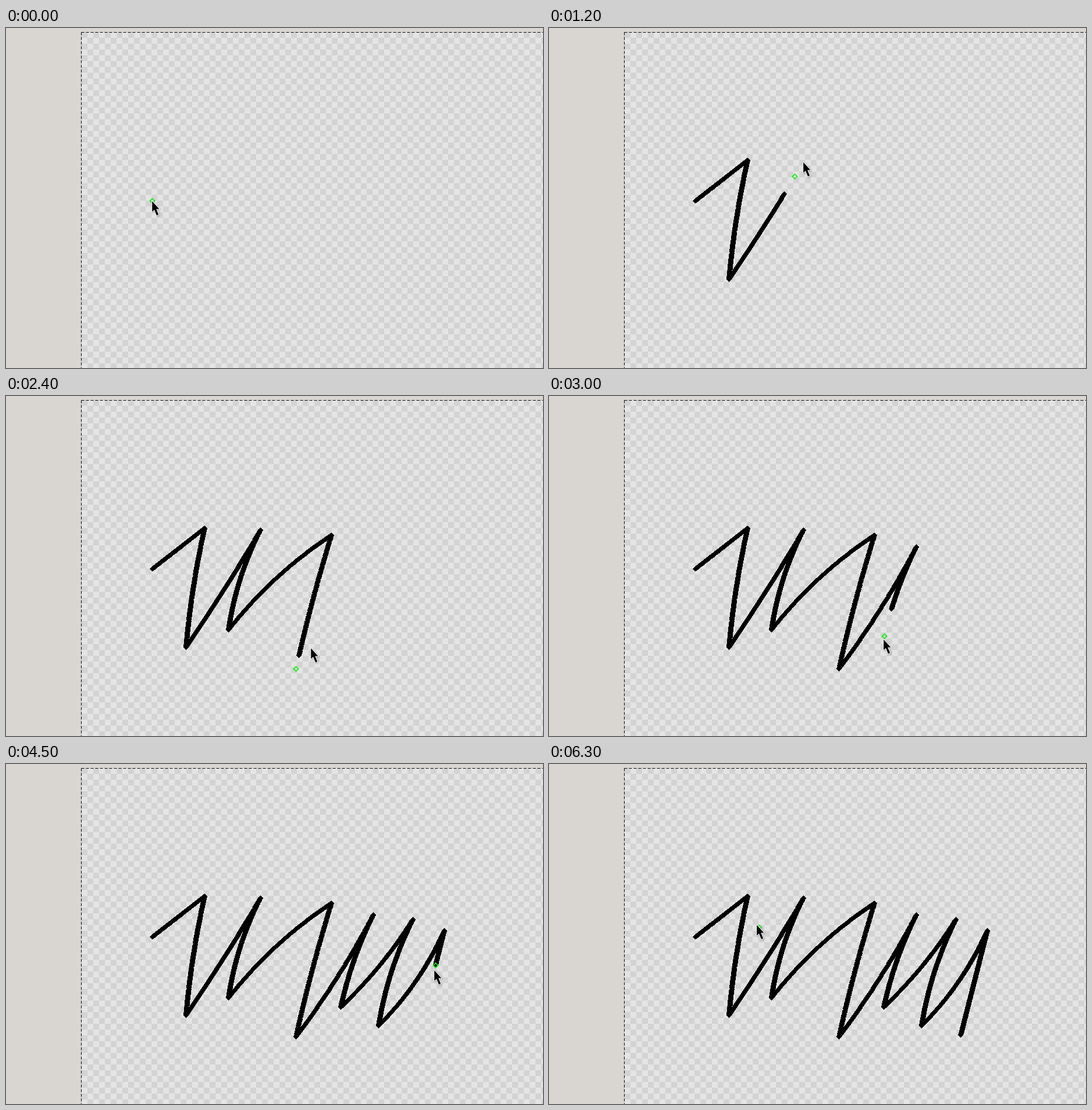
An HTML page with a canvas that plays this animation: 923 px wide and 585 px high, repeating every 6.6 s.

```html
<!DOCTYPE html>
<html lang="en">
<head>
<meta charset="utf-8">
<title>Ink stroke</title>
<style>
html, body { margin: 0; width: 100%; height: 100%; overflow: hidden; background: #d9d5d0; }
canvas { display: block; }
</style>
</head>
<body>
<canvas id="stage" width="923" height="585"></canvas>
<script>
const W = 923, H = 585, STEP = 300, COUNT = 22;
const LEFT = 130, TOP = 7, CELL = 10, NIB = 4;
const ctx = document.getElementById('stage').getContext('2d');

// Corners of the zigzag: x, y and how far the line to the next corner bows
const corners = [
  [251, 297, 0], [341, 227, -3.5], [309, 432, -2], [437, 230, -7.5],
  [382, 402, 9.8], [559, 239, -2.5], [498, 469, -5], [631, 259, -5.4],
  [575, 418, -6], [699, 267, -7.5], [640, 450, -9], [753, 286, 0], [707, 467, 0]
];

// Step, then distance along the zigzag (in corners) of ink, brush and pointer
const keys = [
  [0, -1, 0, 0], [1, 0, 0.35, 0.42], [4, 2.73, 2.88, 3], [8, 5.9, 6, 6.18],
  [10, 7.68, 7.97, 8], [13, 9.99, 10, 10.12], [16, 12, 12, 12]
];

// The pointer's way back, one place per step
const back = [[704, 468], [661, 456], [543, 391], [428, 333], [380, 303], [356, 275]];

const arrow = new Path2D('M1.2 2V20.2L5 16.8L9 26.4L12.2 25L8.3 15.6H13.4Z');
const mix = (a, b, t) => a + (b - a) * t;
const mixPoint = (p, q, t) => [mix(p[0], q[0], t), mix(p[1], q[1], t)];

// Point on the zigzag; each side is a quadratic curve
function along(s) {
  const i = Math.min(Math.floor(s), corners.length - 2), t = s - i;
  const [ax, ay, bow] = corners[i], [bx, by] = corners[i + 1];
  const dx = bx - ax, dy = by - ay;
  const push = 4 * t * (1 - t) * bow / Math.hypot(dx, dy);
  return [ax + dx * t + dy * push, ay + dy * t - dx * push];
}

function pose(step) {
  const last = keys[keys.length - 1];
  if (step > last[0]) {
    const n = step - last[0], [x, y] = back[n];
    const [bx, by] = mixPoint(back[n], back[n - 1], 0.15);
    return { ink: last[1], brush: [bx + 1, by + 2], pointer: [x, y] };
  }
  const j = Math.max(1, keys.findIndex(k => k[0] >= step));
  const a = keys[j - 1], b = keys[j], t = (step - a[0]) / (b[0] - a[0]);
  const [ink, brush, lead] = [1, 2, 3].map(c => mix(a[c], b[c], t));
  const [x, y] = along(lead);
  return { ink, brush: along(brush), pointer: [x - 1, y - 1] };
}

function makeBackdrop() {
  const canvas = document.createElement('canvas');
  canvas.width = W;
  canvas.height = H;
  const c = canvas.getContext('2d');
  c.fillStyle = '#d9d5d0';
  c.fillRect(0, 0, W, H);
  for (let y = TOP, row = 0; y < H; y += CELL, row++) {
    for (let x = LEFT, col = 0; x < W; x += CELL, col++) {
      c.fillStyle = (row + col) % 2 ? '#e4e4e4' : '#d3d3d3';
      c.fillRect(x, y, CELL, CELL);
    }
  }
  c.setLineDash([5, 3]);
  c.stroke(new Path2D(`M129.5 7.5H${W}M129.5 7.5V${H}`));
  return canvas;
}

// Diamond nib stamped on whole pixels, so the edge stays stepped
function dab(x, y) {
  for (let d = -NIB; d <= NIB; d++) {
    const half = NIB - Math.abs(d);
    ctx.fillRect(Math.round(x) - half, Math.round(y) + d, 2 * half + 1, 1);
  }
}

function drawInk(amount) {
  ctx.fillStyle = '#000';
  for (let s = 0; s <= amount; s += 1 / 200) dab(...along(s));
}

function drawBrush(x, y) {
  ctx.save();
  ctx.translate(Math.round(x) + 0.5, Math.round(y) + 0.5);
  ctx.rotate(Math.PI / 4);
  ctx.strokeStyle = '#0cf00c';
  ctx.lineWidth = 1.7;
  ctx.strokeRect(-2.9, -2.9, 5.8, 5.8);
  ctx.restore();
}

function drawPointer(x, y) {
  ctx.save();
  ctx.translate(Math.round(x), Math.round(y));
  ctx.lineJoin = 'round';
  ctx.shadowColor = 'rgba(0,0,0,.35)';
  ctx.shadowBlur = 3;
  ctx.shadowOffsetX = ctx.shadowOffsetY = 1;
  ctx.strokeStyle = '#fff';
  ctx.lineWidth = 2;
  ctx.stroke(arrow);
  ctx.shadowColor = 'transparent';
  ctx.fillStyle = '#000';
  ctx.fill(arrow);
  ctx.restore();
}

const backdrop = makeBackdrop();
const start = performance.now();
let shown = -1;

function tick() {
  const step = Math.floor((performance.now() - start) / STEP) % COUNT;
  if (step !== shown) {
    shown = step;
    const { ink, brush, pointer } = pose(step);
    ctx.drawImage(backdrop, 0, 0);
    drawInk(ink);
    drawBrush(...brush);
    drawPointer(...pointer);
  }
  requestAnimationFrame(tick);
}
tick();
</script>
</body>
</html>
```
